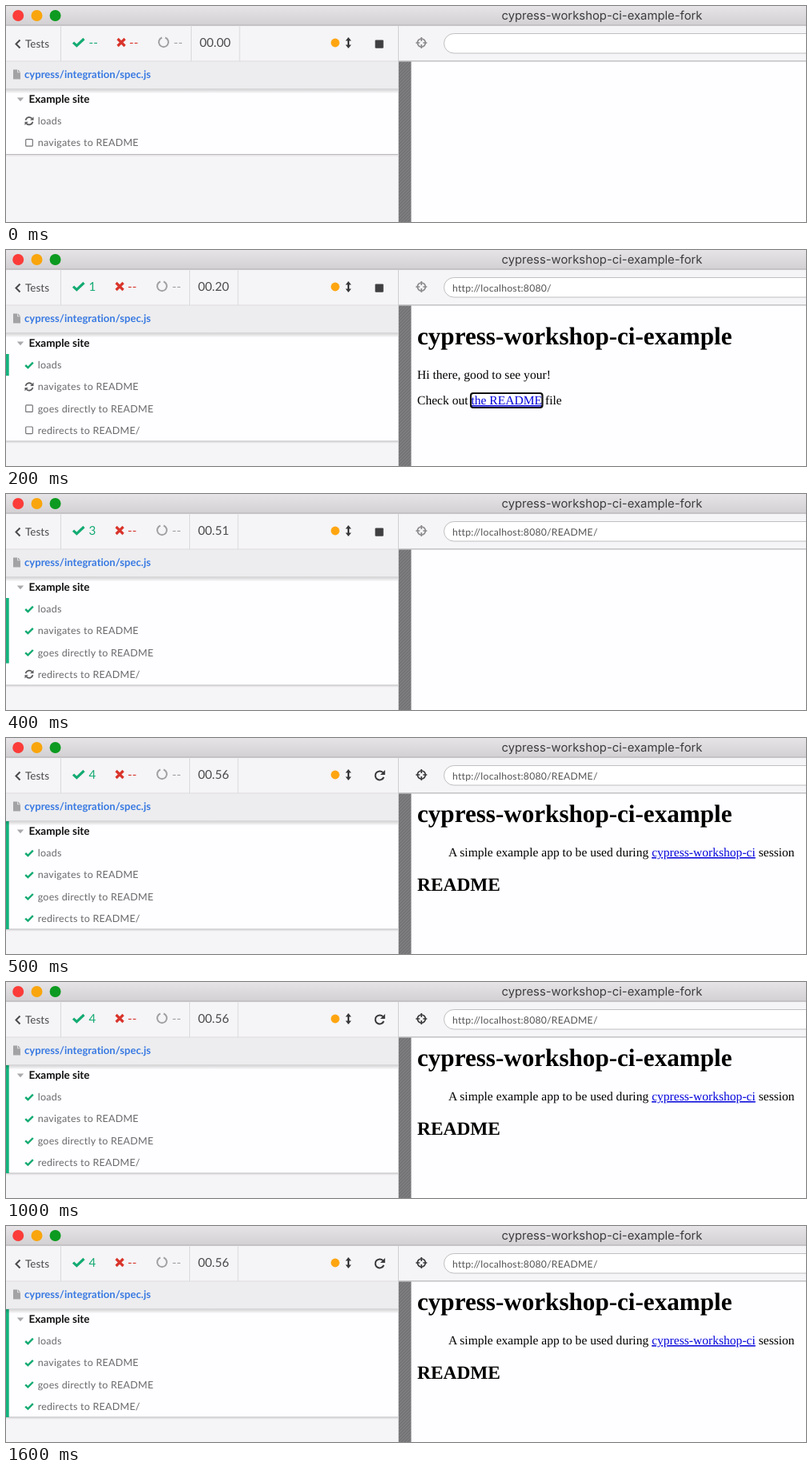
Animation of 1000 by 270 pixels, one loop 1.7 s. Source, as an HTML page:

```html
<!DOCTYPE html>
<html lang="en">
<head>
<meta charset="utf-8">
<title>Test runner</title>
<style>
  html, body { margin: 0; width: 100%; height: 100%; overflow: hidden; background: #f5f4f6; }
  svg { display: block; width: 1000px; height: 270px; }
  text {
    font-family: Lato, "Open Sans", sans-serif; font-size: 12.5px; letter-spacing: .25px;
    font-variant-ligatures: none; text-rendering: geometricPrecision; fill: #6a696b;
  }
  .title { font-family: Inter, Roboto, sans-serif; font-size: 14.85px; letter-spacing: 0; fill: #3d3c3e; text-anchor: middle; }
  .bold { font-size: 13.1px; letter-spacing: 0; font-weight: 700; }
  .stat { font-size: 15.2px; letter-spacing: 0; }
  .url { font-size: 12.2px; fill: #555456; }
  .page text { font-family: "Liberation Serif", "Times New Roman", serif; font-size: 15.57px; letter-spacing: 0; fill: #000; }
  .page .h1 { font-size: 31.12px; font-weight: 700; }
  .page .h2 { font-size: 23.4px; font-weight: 700; }
  .link { fill: #0505da; text-decoration: underline; }
</style>
</head>
<body>
<svg viewBox="0 0 1000 270" xmlns="http://www.w3.org/2000/svg">
  <defs>
    <linearGradient id="bar" x2="0" y2="1">
      <stop stop-color="#e6e4e6"/><stop offset="1" stop-color="#d2d0d2"/>
    </linearGradient>
    <linearGradient id="shade" x2="0" y2="1">
      <stop stop-color="#000" stop-opacity=".18"/><stop offset="1" stop-color="#000" stop-opacity="0"/>
    </linearGradient>
    <pattern id="stripes" width="4" height="4" patternUnits="userSpaceOnUse">
      <rect width="4" height="4" fill="#807f81"/>
      <path d="M-1 1L1-1M0 4L4 0M3 5L5 3" stroke="#706f71" stroke-width="1.3"/>
    </pattern>
    <g id="sync">
      <g id="half">
        <path d="M-4.5-1A4.6 4.6 0 0 1 3.4-3.1" fill="none" stroke="#5c5b5d" stroke-width="1.8"/>
        <path d="M5.5-5.3V-1H1.2z" fill="#5c5b5d"/>
      </g>
      <use href="#half" transform="rotate(180)"/>
    </g>
    <path id="done" d="M-4.8 .3L-1.6 3.3L4.8-3.1" fill="none" stroke="#13ab72" stroke-width="2.4"/>
    <rect id="todo" x="-4.3" y="-4.3" width="8.6" height="8.6" rx="1" fill="none" stroke="#747375" stroke-width="1.2"/>
  </defs>

  <rect width="1000" height="270" fill="#f5f4f6"/>
  <rect width="1000" height="24" fill="url(#bar)"/>
  <rect y="23.6" width="1000" height="1" fill="#a9a7a9"/>
  <circle cx="15.2" cy="12" r="7" fill="#fb3c39"/>
  <circle cx="38.5" cy="12" r="7" fill="#f9a50d"/>
  <circle cx="61.6" cy="12" r="7" fill="#0c9a20"/>
  <text class="title" x="745" y="17.4">cypress-workshop-ci-example-fork</text>

  <path d="M17.5 42.5L12.5 47.5L17.5 52.5" fill="none" stroke="#4a494b" stroke-width="2"/>
  <text x="24" y="52.2" style="font-size:13.5px;letter-spacing:0;fill:#4a494b">Tests</text>
  <path d="M68.5 24.5V69" stroke="#d9d8da"/>
  <path d="M84 45.6L88.4 49.6L97.5 41" fill="none" stroke="#13ab72" stroke-width="3.2"/>
  <circle cx="411.5" cy="46" r="5.4" fill="#ffa511"/>
  <path d="M428 39L431.6 43.4H429.1V48.6H431.6L428 53L424.4 48.6H426.9V43.4H424.4z" fill="#39383a"/>

  <rect y="69" width="490" height="35" fill="#ededef"/>
  <rect y="68.5" width="490" height="1" fill="#dddcde"/>
  <path d="M9 79.5H14.2V83.2H18V91.5H9z" fill="#a3a2a4"/>
  <path d="M15 79.5L18 82.4H15z" fill="#a3a2a4"/>
  <text class="bold" x="23" y="90.3" style="fill:#3879e2">cypress/integration/spec.js</text>

  <g id="left"></g>
  <rect y="103.5" width="490" height="6" fill="url(#shade)"/>

  <rect x="506" y="69" width="494" height="201" fill="#fefdff"/>
  <rect x="491" y="69" width="15.5" height="201" fill="url(#stripes)"/>
  <path d="M490.5 24.5V270" stroke="#cfced0"/>
  <rect x="491" y="68" width="509" height="1.6" fill="#c6c5c7"/>
  <rect x="547.5" y="34.5" width="480" height="24.5" rx="12.25" fill="#fff" stroke="#bfbec0"/>
  <g id="right"></g>
</svg>
<script>
const LOOP = 1700;
const TESTS = ["loads", "navigates to README", "goes directly to README", "redirects to README/"];
const ROOT = "http://localhost:8080/";
const README = ROOT + "README/";

// start ms, passed tests, clock, rows listed, address, page
const STEPS = [
  [0, 0, "00.00", 2, "", ""],
  [100, 0, "00.05", 4, ROOT, ""],
  [200, 1, "00.20", 4, ROOT, "home"],
  [300, 2, "00.36", 4, README, "readme"],
  [400, 3, "00.51", 4, README, ""],
  [500, 4, "00.56", 4, README, "readme"]
];

const text = (x, y, s, cls = "", style = "") =>
  `<text x="${x}" y="${y}" class="${cls}" style="${style}">${s}</text>`;

const PAGES = {
  "": "",
  home:
    text(514, 117.5, "cypress-workshop-ci-example", "h1") +
    text(514, 161, "Hi there, good to see your!") +
    text(514, 193, 'Check out <tspan class="link">the README</tspan> file') +
    '<rect x="581" y="179" width="89.5" height="18" rx="3" fill="none" stroke="#101010" stroke-width="2.2"/>',
  readme:
    text(514, 104.7, "cypress-workshop-ci-example", "h1") +
    text(553, 148, 'A simple example app to be used during <tspan class="link">cypress-workshop-ci</tspan> session') +
    text(514, 190.7, "README", "h2")
};

function stats(passed, clock) {
  const dx = passed ? 0 : 2;
  return text(103.5, 51, passed || "--", "stat", "fill:#13ab72") +
    `<g transform="translate(${dx})">` +
    '<path d="M137.6 41L146.6 50M146.6 41L137.6 50" stroke="#d9342b" stroke-width="3.2"/>' +
    text(152, 51, "--", "stat", "fill:#d9342b") +
    '<path d="M197 39.5A6 6 0 1 1 193 39.5" fill="none" stroke="#a09fa1" stroke-width="2"/>' +
    text(207.5, 51, "--", "stat", "fill:#a09fa1") +
    '<path d="M229.5 24.5V69M290 24.5V69" stroke="#d9d8da"/>' +
    text(240, 51.3, clock, "stat", "fill:#4a494b") + "</g>";
}

function list(passed, rows) {
  const bottom = rows === 4 ? 239 : 185.5;
  const all = passed === TESTS.length;
  let out = `<rect y="104" width="490" height="${bottom - 104}" fill="#fefdff"/>` +
    `<rect y="${bottom - .5}" width="490" height="1.2" fill="#b9b8ba"/>` +
    `<rect y="${bottom + .7}" width="490" height="1.6" fill="#e6e5e7"/>`;
  if (passed) {
    const top = all ? 104 : 130;
    const end = all ? bottom : 130 + 27.2 * passed;
    out += `<rect y="${top}" width="3.7" height="${end - top}" fill="#14b37d"/>`;
  }
  out += '<path d="M13.8 114.5H22.2L18 119.3z" fill="#a9a8aa"/>' +
    text(28.5, 121.3, "Example site", "bold", "font-size:13.5px;fill:#111");
  TESTS.slice(0, rows).forEach((name, i) => {
    const y = 143.7 + 27.2 * i;
    const icon = i < passed ? "done" : i === passed ? "sync" : "todo";
    out += `<use href="#${icon}" x="29" y="${y}"/>` + text(39.7, y + 4.4, name);
  });
  return out;
}

function control(finished) {
  return finished
    ? '<path d="M471.2 43.2A5.5 5.5 0 1 0 472.2 49" fill="none" stroke="#39383a" stroke-width="2"/>' +
      '<path d="M473.8 40V46H467.8z" fill="#39383a"/>'
    : '<rect x="461.4" y="42.4" width="10.4" height="10.4" rx="1" fill="#3f3e40"/>';
}

function target(finished) {
  return `<g fill="none" stroke="${finished ? "#39383a" : "#8a898b"}" stroke-width="1.7">` +
    '<circle cx="519.3" cy="46" r="5"/>' +
    '<path d="M519.3 39V44M519.3 48V53M512.3 46H517.3M521.3 46H526.3"/></g>';
}

const left = document.getElementById("left");
const right = document.getElementById("right");
let shown = null;

function show(step) {
  const [, passed, clock, rows, url, page] = step;
  const finished = passed === TESTS.length;
  left.innerHTML = stats(passed, clock) + control(finished) + list(passed, rows);
  right.innerHTML = target(finished) + text(558, 51.8, url, "url") +
    `<g class="page">${PAGES[page]}</g>`;
}

function draw() {
  const t = performance.now() % LOOP;
  const step = STEPS.findLast(s => s[0] <= t);
  if (step !== shown) show(shown = step);
  requestAnimationFrame(draw);
}
draw();
</script>
</body>
</html>
```
